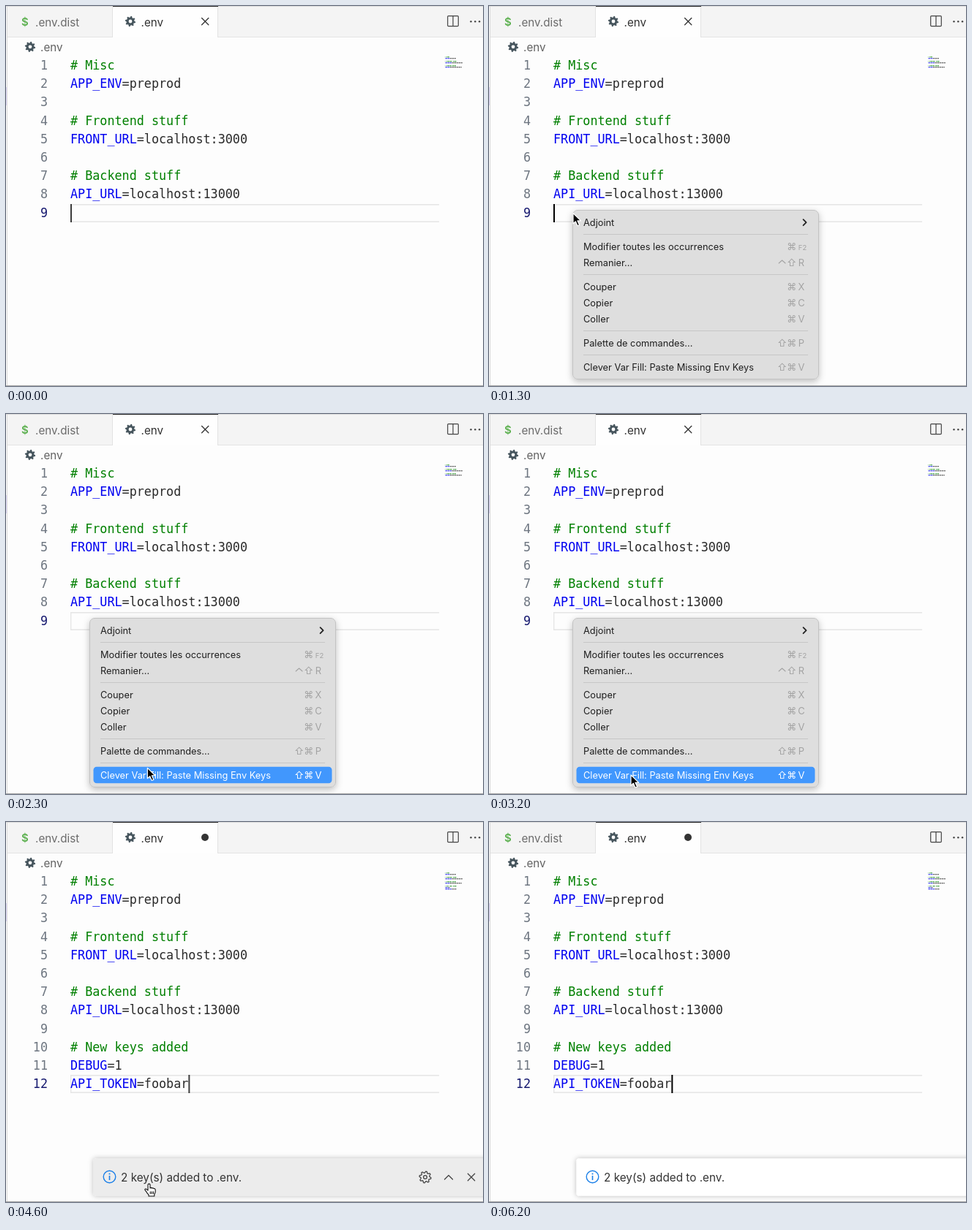
These frames come from a looping animation (652 by 520 pixels, 6.3 s). An HTML page:

```html
<!DOCTYPE html>
<html lang="fr">
<head>
<meta charset="utf-8">
<title>.env editor</title>
<style>
  html, body { margin: 0; width: 100%; height: 100%; overflow: hidden; background: #fdfdfd; }
  svg { display: block; width: 652px; height: 520px; }
  text { white-space: pre; }
  .ui { font-family: Inter, sans-serif; }
  .tab { font-size: 15.2px; }
  .code { font: 16.75px "DejaVu Sans Mono", monospace; }
  .menu { font-size: 12.8px; }
  .key { font: 13px Inter, "DejaVu Sans", sans-serif; text-anchor: middle; }
  .line { fill: none; stroke-linecap: round; stroke-linejoin: round; }
</style>
</head>
<body>
<svg id="stage" viewBox="0 0 652 520" xmlns="http://www.w3.org/2000/svg"></svg>
<script>
const LOOP = 6300, STEP = 100;
const BLUE = '#0000f0', GREEN = '#008000', INK = '#2b2b2b', SLATE = '#47565e';
const stage = document.getElementById('stage');

function add(parent, tag, attrs = {}, text) {
  const el = document.createElementNS('http://www.w3.org/2000/svg', tag);
  for (const k in attrs) el.setAttribute(k, attrs[k]);
  if (text !== undefined) el.textContent = text;
  parent.appendChild(el);
  return el;
}
const rect = (p, x, y, width, height, fill, more) =>
  add(p, 'rect', { x, y, width, height, fill, ...more });
const label = (p, x, y, text, cls, fill, more) =>
  add(p, 'text', { x, y, class: cls, fill, ...more }, text);
const stroke = (p, d, color, width) =>
  add(p, 'path', { d, class: 'line', stroke: color, 'stroke-width': width });
const cross = (p, x, y, r, color) =>
  stroke(p, `M${x - r} ${y - r}l${2 * r} ${2 * r}m0 ${-2 * r}l${-2 * r} ${2 * r}`, color, 1.3);
const show = (el, on) => el.setAttribute('visibility', on ? 'inherit' : 'hidden');
const move = (el, x, y) => el.setAttribute('transform', `translate(${x} ${y})`);

// Cog outline with eight teeth and a round hole
function gear(p, x, y, outer, inner, hole, attrs) {
  let d = '';
  for (let i = 0; i < 32; i++) {
    const a = (i - 1.5) * Math.PI / 16;
    const r = i % 4 < 2 ? inner : outer;
    d += (i ? 'L' : 'M') + (x + r * Math.cos(a)).toFixed(2) + ' ' + (y + r * Math.sin(a)).toFixed(2);
  }
  d += `ZM${x - hole} ${y}a${hole} ${hole} 0 1 0 ${2 * hole} 0a${hole} ${hole} 0 1 0 ${-2 * hole} 0Z`;
  return add(p, 'path', { d, 'fill-rule': 'evenodd', ...attrs });
}

const defs = add(stage, 'defs');
function shadow(id, dy, blur, opacity) {
  const f = add(defs, 'filter', { id, x: '-15%', y: '-40%', width: '130%', height: '180%' });
  add(f, 'feDropShadow', { dx: 0, dy, stdDeviation: blur, 'flood-color': '#000', 'flood-opacity': opacity });
}
shadow('menuShade', 3, 5, .25);
shadow('toastShade', 0, 3.5, .28);

// Window frame and tabs
rect(stage, 0, 0, 652, 520, '#fdfdfd');
rect(stage, 2, 0, 650, 42, '#f4f4f4');
rect(stage, 2, 42, 650, 1, '#e4e4e4');
rect(stage, 0, 0, 652, 1, '#dcdcdc');
rect(stage, 146, 0, 143, 43, '#fefefe');
rect(stage, 145, 0, 1, 43, '#e2e2e2');
rect(stage, 289, 0, 1, 43, '#e2e2e2');
rect(stage, 146, 0, 144, 1, '#222');
rect(stage, 1, 0, 1, 520, '#dadada');
rect(stage, 0, 111, 1, 25, '#dcd6f7');

label(stage, 26, 26.5, '$', 'ui', '#5cb04f', { 'font-size': 15, 'font-weight': 600, 'text-anchor': 'middle' });
label(stage, 40, 27.5, '.env.dist', 'ui tab', '#6b6b6b');
gear(stage, 170, 21, 7.2, 5.4, 2.4, { fill: SLATE });
label(stage, 184.5, 27.5, '.env', 'ui tab', '#303030');
const closeTab = cross(stage, 272.2, 21.1, 4.6, '#333');
const dirty = add(stage, 'circle', { cx: 272, cy: 21, r: 5, fill: '#333' });
rect(stage, 603.7, 13.6, 14.6, 14, 'none', { stroke: '#444', 'stroke-width': 1.2, rx: 1 });
rect(stage, 610.4, 14, 1.2, 13, '#444');
for (const x of [635.5, 641.3, 647.1]) add(stage, 'circle', { cx: x, cy: 21.2, r: 1.2, fill: '#444' });

gear(stage, 33, 55.8, 7.2, 5.4, 2.4, { fill: SLATE });
label(stage, 47, 62, '.env', 'ui tab', '#616161');

// Editor text; rows after the ninth appear with the paste
const LINES = ['# Misc', 'APP_ENV=preprod', '', '# Frontend stuff', 'FRONT_URL=localhost:3000', '',
  '# Backend stuff', 'API_URL=localhost:13000', '', '# New keys added', 'DEBUG=1', 'API_TOKEN=foobar'];
const CHAR = 10.085, ROW = 25.2;
const current = add(stage, 'g');
rect(current, 88, 0, 504, 1.6, '#e6e6e6');
rect(current, 88, 23.4, 504, 1.6, '#e6e6e6');
rect(current, 88, 0, 1.4, 25, '#e6e6e6');
const pasted = add(stage, 'g');
const numbers = [];
LINES.forEach((s, i) => {
  const p = i > 8 ? pasted : stage, y = Math.round(87 + i * ROW);
  numbers.push(label(p, 57, y, i + 1, 'code', '#6e7681', { 'text-anchor': 'end' }));
  const cut = s[0] === '#' ? s.length : s.indexOf('=');
  if (s) {
    const t = label(p, 88, y, '', 'code', INK);
    add(t, 'tspan', { fill: s[0] === '#' ? GREEN : BLUE }, s.slice(0, cut));
    add(t, 'tspan', {}, s.slice(cut));
  }
  [...s].forEach((c, k) => {
    if (c === ' ') return;
    const color = s[0] === '#' ? GREEN : k < cut ? BLUE : INK;
    rect(p, 600 + k, 69 + i * 2, 1, 1.4, color, { opacity: k % 3 ? .62 : .35 });
  });
});
const caret = rect(stage, 88, 0, 2, 25, '#000');

// Notification
const toast = add(stage, 'g');
const card = rect(toast, 119.5, 460.5, 540, 51, '#fff', { rx: 3, filter: 'url(#toastShade)' });
add(toast, 'circle', { cx: 141.5, cy: 485.5, r: 8.3, fill: 'none', stroke: '#1a7fe8', 'stroke-width': 1.4 });
rect(toast, 140.7, 484, 1.6, 6, '#1a7fe8');
rect(toast, 140.6, 480.6, 1.8, 1.8, '#1a7fe8');
label(toast, 157, 491.5, '2 key(s) added to .env.', 'ui', '#333', { 'font-size': 15.3 });
const tools = add(toast, 'g');
gear(tools, 573, 486, 8, 6, 2.4, { fill: 'none', stroke: '#444', 'stroke-width': 1.3, 'stroke-linejoin': 'round' });
stroke(tools, 'M599.5 489l5.5-5.5 5.5 5.5', '#444', 1.3);
cross(tools, 636, 486, 4.7, '#444');

// Context menu
const menu = add(stage, 'g');
rect(menu, 114.5, 279.5, 336, 231, '#dedede', { rx: 6.5, stroke: '#c3c3c3', 'stroke-width': 1, filter: 'url(#menuShade)' });
for (const y of [312, 367, 444, 477]) rect(menu, 129, y, 307, 1, '#c6c6c6');
const glow = rect(menu, 119.5, 0, 326, 22.6, '#4197fd', { rx: 4.5 });
const ITEMS = [
  [296, 'Adjoint', ''],
  [329, 'Modifier toutes les occurrences', '⌘ F2'],
  [351, 'Remanier...', '^ ⇧ R'],
  [384, 'Couper', '⌘ X'],
  [406, 'Copier', '⌘ C'],
  [428, 'Coller', '⌘ V'],
  [461, 'Palette de commandes...', '⇧ ⌘ P'],
  [494, 'Clever Var Fill: Paste Missing Env Keys', '⇧ ⌘ V']
];
const rows = ITEMS.map(([y, name, keys]) => {
  const text = label(menu, 129, y + 5, name, 'ui menu', '#1f1f1f');
  const hint = add(menu, 'g');
  keys.split(' ').filter(Boolean).reverse().forEach((k, i) => {
    const x = 427 - i * 13.2;
    if (k === '^') stroke(hint, `M${x - 4.5} ${y + 1}l4.5-4 4.5 4`, 'currentColor', 1.1);
    else label(hint, k === 'F2' ? 428.5 : x, y + 5, k, 'key', 'currentColor', k === 'F2' ? { style: 'font-size:9.5px' } : {});
  });
  return { y, text, hint };
});
stroke(menu, 'M429.6 292.2l4 4-4 4', '#222', 1.8);

// Pointers
const arrow = add(stage, 'path', {
  d: 'M0 0V14.4L3.4 11.3L5.9 17.2L8.5 16.1L6 10.4H10.6Z',
  fill: '#000', stroke: '#fff', 'stroke-width': 1.2, 'stroke-linejoin': 'round'
});
const beam = add(stage, 'g');
const beamPath = 'M-3-8Q0-8 0-5.5Q0-8 3-8M0-5.5V5.5M-3 8Q0 8 0 5.5Q0 8 3 8';
stroke(beam, beamPath, '#fff', 2.6);
stroke(beam, beamPath, '#222', 1.2);
const hand = add(stage, 'path', {
  d: 'M0 1Q1.6-.8 3 1V6Q4.4 4.6 5.6 6.2Q7 5.2 8.1 6.8Q10 6.2 10.2 8.4V11Q10 13 8.8 14.4V17H1V15Q-.8 13.4-2 11.2L-4 8.6Q-4.4 6.6-2.4 7.2L0 9.2ZM3.3 10.5V14M5.4 10.5V14M7.5 10.5V14',
  fill: '#fff', stroke: '#111', 'stroke-width': 1.1, 'stroke-linejoin': 'round'
});

const clamp = v => Math.max(0, Math.min(1, v));
const PATH = [[0, 312, 540], [100, 298, 512], [500, 185, 365], [900, 115, 283.5], [1400, 115, 283.5],
  [1600, 145, 332], [1900, 189, 422.5], [2100, 192, 465], [2400, 194, 494]];
function pointer(t) {
  for (let i = 1; i < PATH.length; i++) {
    const [t0, x0, y0] = PATH[i - 1], [t1, x1, y1] = PATH[i];
    if (t < t1) {
      const k = (t - t0) / (t1 - t0);
      return [x0 + (x1 - x0) * k, y0 + (y1 - y0) * k];
    }
  }
  return PATH[PATH.length - 1].slice(1);
}

const OPEN = 1200, CLICK = 3400, FADE = 3600, PASTE = 4000, HOVER = 4200, LEAVE = 5300;

// Blinking restarts at each click or edit
function blink(t) {
  const start = t >= PASTE ? 4050 : t >= OPEN ? 1250 : -600;
  const phase = Math.max(0, t - start) % 1060;
  return phase < 530 ? 1 : phase < 690 ? .75 : 0;
}

function draw(time) {
  const t = Math.floor(time / STEP) * STEP;
  const done = t >= PASTE;
  const [x, y] = pointer(t);

  show(closeTab, !done);
  show(dirty, done);
  show(pasted, done);
  const top = done ? 346 : 271;
  move(current, 0, top);
  numbers.forEach((n, i) => n.setAttribute('fill', i === (done ? 11 : 8) ? '#171a70' : '#6e7681'));
  caret.setAttribute('x', done ? 88 + 16 * CHAR : 88);
  caret.setAttribute('y', top);
  caret.setAttribute('opacity', blink(t));

  const fade = 1 - clamp((t - FADE) / 125);
  show(menu, t >= OPEN && fade > 0);
  menu.setAttribute('opacity', fade < 1 ? fade * 1.1 : 1);
  const lit = t > 1400 && t !== CLICK ? rows.find(r => Math.abs(r.y - y) <= 11) : null;
  show(glow, !!lit);
  if (lit) glow.setAttribute('y', lit.y - 11.3);
  glow.setAttribute('fill', fade < 1 ? '#0a7ac0' : '#4197fd');
  for (const r of rows) {
    r.text.setAttribute('fill', r === lit ? '#fff' : '#1f1f1f');
    r.hint.setAttribute('color', r === lit ? '#fff' : '#a3a3a3');
  }

  const hover = t >= HOVER && t < LEAVE;
  const rise = clamp((t - PASTE) / 200);
  show(toast, rise > 0);
  toast.setAttribute('opacity', rise);
  move(toast, 0, (1 - rise) * 60);
  card.setAttribute('fill', hover ? '#ececec' : '#fff');
  show(tools, hover);

  show(arrow, t >= OPEN && t < PASTE);
  show(beam, t > 0 && t < OPEN || done && t < HOVER);
  show(hand, hover);
  for (const p of [arrow, beam]) move(p, x, y);
  move(hand, x, y + 1);
}

// Lower edge of the editor pane
rect(stage, 0, 519, 652, 1, '#a8a8a8');

const begin = performance.now();
function tick() {
  draw((performance.now() - begin) % LOOP);
  requestAnimationFrame(tick);
}
tick();
</script>
</body>
</html>
```
